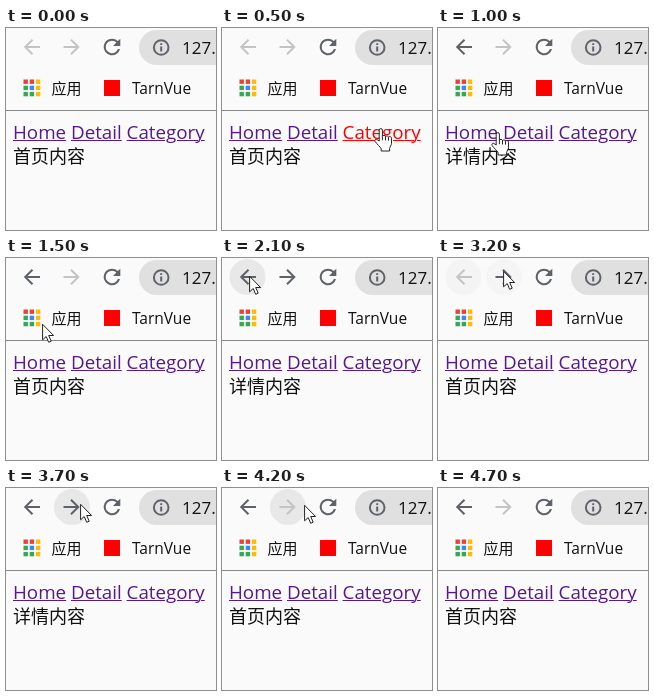
An HTML page for the animation above (4800 ms loop, 210 by 202 pixels).

```html
<!DOCTYPE html>
<html lang="zh-CN">
<head>
<meta charset="utf-8">
<title>Hash router</title>
<style>
  html, body { margin: 0; width: 100%; height: 100%; overflow: hidden; background: #fafafa; }
  #stage { position: relative; width: 210px; height: 202px; overflow: hidden; }
  svg { position: absolute; left: 0; top: 0; display: block; }
  text { font-family: "Open Sans", "Noto Sans CJK SC", "Noto Sans CJK", sans-serif; fill: #111; }
  .links {
    position: absolute; left: 7px; top: 92px; margin: 0; white-space: nowrap;
    font: 18.75px/24px "Open Sans", sans-serif;
  }
  .links a { color: #551a8b; text-decoration: underline 1px; }
  .icon { fill: none; stroke: currentColor; stroke-width: 2; color: #5f6368; }
  .off { color: #c3c4c6; }
  .hover { fill: #e8e8e9; opacity: 0; }
  .cjk, .page text { font-family: "Noto Sans CJK SC", "Noto Sans CJK", sans-serif; }
  .page text { font-size: 18px; visibility: hidden; }
  .cursor { fill: #fff; stroke: #222; stroke-width: 1; stroke-linejoin: round; visibility: hidden; }
</style>
</head>
<body>
<div id="stage">
  <svg width="210" height="202" viewBox="0 0 210 202">
    <circle class="hover" id="backHover" cx="25.5" cy="19" r="18"/>
    <circle class="hover" id="nextHover" cx="66" cy="19" r="18"/>
    <path class="icon off" id="back" d="M34 19H19.5M26.5 11.7L19.2 19l7.3 7.3"/>
    <path class="icon off" id="next" d="M57.5 19H72M65 11.7l7.3 7.3-7.3 7.3"/>
    <path transform="translate(93.5 6.5) scale(1.04)" fill="#5f6368"
      d="M17.65 6.35A7.96 7.96 0 0 0 12 4a8 8 0 1 0 7.73 10h-2.08A6 6 0 1 1 12 6c1.66 0 3.14.69 4.22 1.78L13 11h7V4z"/>

    <rect x="133" y="2" width="120" height="35" rx="17.5" fill="#e0e0e1"/>
    <circle class="icon" cx="155.2" cy="19.5" r="7.3" stroke-width="1.8"/>
    <path class="icon" d="M155.2 18.6v4.8M155.2 15.3v1.8"/>
    <text x="176" y="26" font-size="17">127.</text>

    <g id="apps"></g>
    <text class="cjk" x="45.5" y="66" font-size="15">应用</text>
    <rect x="98" y="52" width="16" height="16" fill="#f00"/>
    <text x="126" y="66" font-size="15.5">TarnVue</text>
    <path d="M0 82.5H210" stroke="#85878a"/>

    <g class="page">
      <text id="home" x="7" y="135.3">首页内容</text>
      <text id="detail" x="7" y="135.3">详情内容</text>
      <text id="category" x="7" y="135.3">分类内容</text>
    </g>
  </svg>

  <p class="links"><a id="homeLink">Home</a> <a id="detailLink">Detail</a> <a id="categoryLink">Category</a></p>

  <svg width="210" height="202" viewBox="0 0 210 202">
    <path class="cursor" id="arrow" d="M.6 1.3V16.8L4.2 13.5l2.5 5.8 2.5-1.1L6.7 12.5h4.9z"/>
    <g class="cursor" id="hand">
      <path d="M5.2 13V2.2a1.6 1.6 0 0 1 3.2 0V8.4a1.6 1.6 0 0 1 3.1.3 1.6 1.6 0 0 1 3 .7 1.6 1.6 0 0 1 3 .9V15.2c0 2.2-1.6 3.4-1.9 5.4V23H7.2V20.8C6.2 18.8 3 16.2 1.2 13.6c-1-1.7.8-3 2.1-1.9z"/>
      <path d="M8.4 8.4V12.2M11.5 8.7V12.4M14.5 9.4V12.6" fill="none"/>
    </g>
  </svg>
</div>
<script>
  const LOOP = 4800;
  const $ = id => document.getElementById(id);

  // Each key is [time in ms, value], held until the next one.
  function hold(id, prop, keys) {
    const frames = [...keys, [LOOP, keys.at(-1)[1]]].map(([t, value]) =>
      ({ offset: t / LOOP, [prop]: value, easing: 'step-end' }));
    $(id).animate(frames, { duration: LOOP, iterations: Infinity });
  }
  const show = on => on ? 'visible' : 'hidden';

  const red = '#ea4335', green = '#34a853', blue = '#4285f4', yellow = '#fbbc05';
  $('apps').innerHTML = [red, red, yellow, green, blue, yellow, green, green, yellow]
    .map((c, i) => `<rect x="${17.5 + i % 3 * 6.2}" y="${51.5 + Math.floor(i / 3) * 6.2}" width="4.4" height="4.4" fill="${c}"/>`)
    .join('');

  const pages = [
    [0, 'home'], [600, 'category'], [900, 'detail'], [1300, 'home'], [2100, 'detail'],
    [2500, 'category'], [2800, 'home'], [3500, 'category'], [3700, 'detail'], [4000, 'home']
  ];
  for (const id of ['home', 'detail', 'category'])
    hold(id, 'visibility', pages.map(([t, page]) => [t, show(page === id)]));

  // Links turn red while pressed.
  for (const [id, t] of [['categoryLink', 500], ['detailLink', 800], ['homeLink', 1200]])
    hold(id, 'color', [[0, '#551a8b'], [t, '#f00'], [t + 100, '#551a8b']]);

  const on = '#5f6368', off = '#c3c4c6';
  hold('back', 'color', [[0, off], [600, on], [2800, off], [3500, on]]);
  hold('next', 'color', [[0, off], [2100, on], [4000, off]]);
  hold('backHover', 'opacity', [[0, 0], [1600, .4], [1700, .8], [1800, 1], [3100, .7], [3200, .3], [3300, 0]]);
  hold('nextHover', 'opacity', [[0, 0], [3200, .25], [3300, .7], [3400, 1], [4300, .6], [4400, .25], [4500, 0]]);

  const moves = [
    [0, '', 186, 60], [100, 'arrow', 186, 60], [200, 'arrow', 181, 72], [300, 'arrow', 173, 85],
    [400, 'hand', 154, 98], [500, 'hand', 152, 100], [600, 'hand', 134, 102],
    [700, 'hand', 108, 102], [800, 'hand', 82, 103], [900, 'hand', 79, 103],
    [1000, 'hand', 53, 104], [1100, 'hand', 40, 104], [1200, 'hand', 36, 104],
    [1400, 'arrow', 39, 88], [1500, 'arrow', 36, 65], [1600, 'arrow', 32, 40],
    [1700, 'arrow', 28, 23], [1800, 'arrow', 27, 17],
    [3000, 'arrow', 36, 16], [3100, 'arrow', 53, 13], [3200, 'arrow', 65, 12],
    [3300, 'arrow', 70, 13], [3400, 'arrow', 73, 14], [3700, 'arrow', 74, 15], [3800, 'arrow', 74, 16],
    [4200, 'arrow', 82, 16], [4300, 'arrow', 100, 19], [4400, 'arrow', 122, 23],
    [4500, 'arrow', 145, 27], [4600, 'arrow', 168, 31], [4700, '', 168, 31]
  ];
  for (const id of ['arrow', 'hand']) {
    hold(id, 'visibility', moves.map(([t, shape]) => [t, show(shape === id)]));
    hold(id, 'transform', moves.map(([t, , x, y]) => [t, `translate(${x}px, ${y}px)`]));
  }
</script>
</body>
</html>
```
